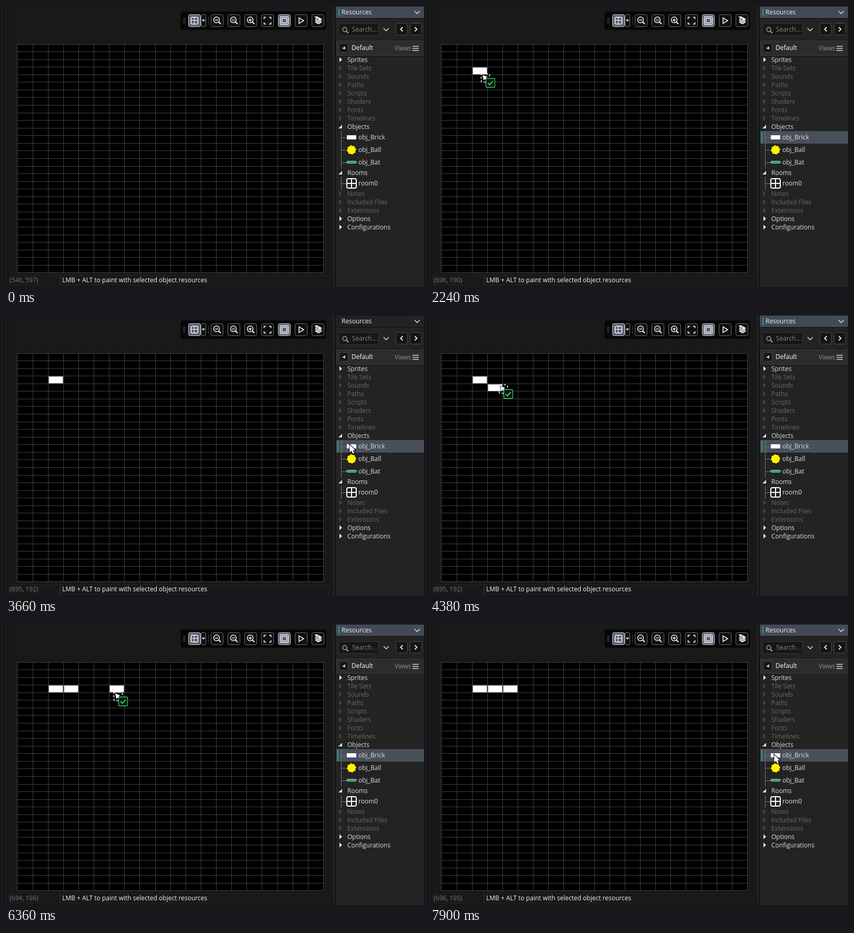
Recreate the animation shown at these times as an HTML page with a canvas. Size 796 by 537 pixels, loop 7990 ms.

```html
<!DOCTYPE html>
<html lang="en">
<head>
<meta charset="utf-8">
<title>Room editor</title>
<style>
  html, body { margin: 0; width: 100%; height: 100%; overflow: hidden; background: #191919; }
  canvas { display: block; }
</style>
</head>
<body>
<canvas id="stage" width="796" height="537"></canvas>
<script>
const ctx = document.getElementById('stage').getContext('2d');
const LOOP = 7990;
const SCALE = 0.91;
const ROOM = { x: 21, y: 73, w: 640, h: 480 };
const LIGHT = '#dedede', DIM = '#696969', GREEN = '#1f9f78', GRID = '#404040';

// Pointer strokes in room units: start, end, steps, from, to, ease, bend, dragging
const move = (t0, t1, steps, from, to, ease = 4.39, bend = 1.2, drag = false) =>
  ({ t0, t1, steps, from, to, ease, bend, drag });
const drag = (t0, t1, steps, from, to) => move(t0, t1, steps, from, to, 3.67, 1, true);
const strokes = [
  move(560, 1280, 9, [546, 597], [701, 189], 3, 1),
  drag(1460, 2240, 10, [696, 190], [83, 61]),
  drag(2330, 2420, 2, [77, 58], [70, 57]),
  drag(2600, 2600, 1, [69, 56], [69, 56]),
  move(2970, 3660, 9, [69, 56], [695, 192]),
  drag(3840, 4470, 8, [695, 192], [119, 66]),
  drag(4650, 4650, 1, [111, 59], [111, 59]),
  move(4920, 5640, 9, [111, 59], [688, 196]),
  move(5730, 5730, 1, [694, 196], [694, 196]),
  drag(5910, 6630, 9, [694, 196], [158, 51]),
  drag(6720, 6720, 1, [154, 51], [154, 51]),
  move(7000, 7720, 9, [154, 51], [692, 195]),
  move(7810, 7900, 2, [695, 195], [696, 195]),
];
const drops = [2970, 4920, 7000];
const unfocused = [[2970, 3840], [4920, 5910], [7000, 7810]];

function pointAt(s, p) {
  const f = 1 - (1 - Math.max(0, p) ** 1.5) ** s.ease;
  return [
    s.from[0] + (s.to[0] - s.from[0]) * f,
    s.from[1] + (s.to[1] - s.from[1]) * f ** s.bend,
  ];
}

function pointerAt(t) {
  const s = strokes.findLast(s => t >= s.t0) || strokes[0];
  const last = s.steps - 1;
  const step = last ? Math.max(0, Math.min(last, Math.floor((t - s.t0 + 1) / (s.t1 - s.t0) * last))) : 1;
  const n = last || 1;
  const [x, y] = pointAt(s, step / n);
  // The readout trails the pointer slightly, and stands still while dragging
  let label = [pointAt(s, (step - 0.24) / n)[0], pointAt(s, (step - 0.46) / n)[1]];
  if (s.drag) label = strokes.findLast(d => d.drag && d.t0 <= s.t0 && d.from[0] > ROOM.w).from;
  return { x, y, drag: s.drag, label };
}

const inRoom = (x, y) => x >= 0 && x < ROOM.w && y >= 0 && y < ROOM.h;

function rect(x, y, w, h, color) {
  ctx.fillStyle = color;
  ctx.fillRect(x, y, w, h);
}
function box(x, y, w, h, r, fill, stroke, line = 1) {
  ctx.beginPath();
  ctx.roundRect(x + 0.5, y + 0.5, w - 1, h - 1, r);
  if (fill) { ctx.fillStyle = fill; ctx.fill(); }
  if (stroke) { ctx.strokeStyle = stroke; ctx.lineWidth = line; ctx.stroke(); }
}
function path(points, { fill, stroke, width = 1, close = !!fill } = {}) {
  ctx.beginPath();
  points.forEach(([x, y]) => ctx.lineTo(x, y));
  if (close) ctx.closePath();
  if (stroke) { ctx.strokeStyle = stroke; ctx.lineWidth = width; ctx.stroke(); }
  if (fill) { ctx.fillStyle = fill; ctx.fill(); }
}
function circle(x, y, r, stroke, width, fill) {
  ctx.beginPath();
  ctx.arc(x, y, r, 0, Math.PI * 2);
  if (fill) { ctx.fillStyle = fill; ctx.fill(); }
  if (stroke) { ctx.strokeStyle = stroke; ctx.lineWidth = width; ctx.stroke(); }
}
function text(str, x, middle, color = LIGHT) {
  ctx.font = '12px "Open Sans", sans-serif';
  ctx.fillStyle = color;
  ctx.fillText(str, x, middle + 4);
}
function chevron(x, y, dx, dy, width = 1.5) {
  const points = dy ? [[x - dx, y - dy], [x, y + dy], [x + dx, y - dy]]
                    : [[x - dx, y - 4], [x + dx, y], [x - dx, y + 4]];
  path(points, { stroke: '#e0e0e0', width });
}

const gridX = i => i ? Math.floor(22 + 32 * SCALE * i) : 21;
const gridY = j => Math.floor(73.05 + 16 * SCALE * j);

function drawRoom() {
  rect(21, 73, 584, 437, '#000');
  for (let i = 0; i <= 20; i++) rect(gridX(i), 73, 1, 437, GRID);
  for (let j = 0; j <= 30; j++) rect(21, gridY(j), 584, 1, GRID);
}
function drawBrick(col, row) {
  const x = gridX(col) + 1, y = gridY(row) + 1;
  rect(x, y, 28, 14, '#808080');
  rect(x + 1, y + 1, 26, 12, '#fff');
}

function magnifier(x, sign) {
  circle(x - 1, 26.5, 5.5, '#fff', 1.4);
  path([[x + 3, 30.5], [x + 7, 34.5]], { stroke: '#fff', width: 2 });
  if (sign === '=') {
    rect(x - 4, 25, 6, 1, '#fff');
    rect(x - 4, 28, 6, 1, '#fff');
    return;
  }
  rect(x - 4, 26, 6, 1.5, '#fff');
  if (sign === '+') rect(x - 1.75, 24, 1.5, 6, '#fff');
}

function drawToolbar() {
  box(332, 10, 278, 36, 3, '#070707');
  for (let y = 23; y < 34; y += 3) rect(337, y, 5, 1, '#555');
  box(347, 16, 24, 24, 3, '#596070', '#c4c8d0');
  box(352, 21, 14, 14, 2, null, '#fff', 1.5);
  rect(358, 21, 1, 14, '#fff');
  rect(352, 27, 14, 1, '#fff');
  box(371, 16, 10, 24, 2, '#101010', '#777');
  path([[373, 26], [379, 26], [376, 30]], { fill: '#fff' });
  rect(385, 20, 1, 16, '#444');

  for (let x = 402; x <= 594; x += 32)
    box(x - 12, 16, 24, 24, 3, x === 530 ? '#596070' : '#101010', x === 530 ? '#c4c8d0' : '#6c6c6c');
  magnifier(402, '-');
  magnifier(434, '=');
  magnifier(466, '+');
  for (const sx of [-1, 1]) for (const sy of [-1, 1])
    path([[498 + sx * 3, 28 + sy * 6.5], [498 + sx * 6.5, 28 + sy * 6.5], [498 + sx * 6.5, 28 + sy * 3]],
      { stroke: '#fff', width: 1.5 });
  box(522, 20, 16, 16, 1, null, '#fff', 1.5);
  box(525, 23, 10, 10, 0, null, '#fff', 1.5);
  path([[558, 22.5], [558, 33.5], [567, 28]], { stroke: '#fff', width: 1.5, close: true });
  for (const y of [31, 28, 25])
    path([[588, y], [595, y - 4], [602, y], [595, y + 4]], { fill: '#fff', stroke: '#101010', width: 1.5 });
  path([[587, 20], [594, 20], [594, 26]], { fill: '#fff', stroke: '#101010', width: 1.5 });
}

function drawStatus(label) {
  rect(4, 513, 616, 22, '#111');
  box(5, 514, 98, 20, 0, '#191919', '#272727');
  box(103, 514, 515, 20, 0, '#191919', '#272727');
  const [x, y] = label.map(Math.round);
  text(`(${x}, ${y})`, 7, 524, inRoom(x, y) ? '#f0f0f0' : '#767676');
  text('LMB + ALT to paint with selected object resources', 107, 524, '#f4f4f4');
}

const folders = [
  ['Sprites', 103, 1], ['Tile Sets', 119], ['Sounds', 135], ['Paths', 151], ['Scripts', 167],
  ['Shaders', 183], ['Fonts', 199], ['Timelines', 215], ['Objects', 231, 2], ['Rooms', 319, 2],
  ['Notes', 359], ['Included Files', 375], ['Extensions', 391], ['Options', 407, 1], ['Configurations', 423, 1],
];
const items = [['obj_Brick', 251], ['obj_Ball', 275], ['obj_Bat', 299], ['room0', 339]];

function drawTree(selected) {
  if (selected) {
    rect(629, 239, 167, 24, '#48505a');
    rect(631, 240, 2, 22, GREEN);
  }
  for (const [name, y, state] of folders) {
    text(name, 650, y, state ? LIGHT : DIM);
    if (state === 2) path([[640, y - 4], [640, y + 3], [633, y + 3]], { fill: '#ddd' });
    else if (state) path([[635, y - 5], [640, y - 0.5], [635, y + 4]], { fill: '#eee' });
    else path([[635.5, y - 4], [639.5, y - 0.5], [635.5, y + 3]], { stroke: '#666', close: true });
  }
  rect(638, 239, 1, 72, '#777');
  rect(638, 327, 1, 24, '#777');
  for (const [name, y] of items) {
    rect(638, y, 10, 1, '#777');
    text(name, 671, y);
  }
  rect(649, 247, 18, 8, '#fff');
  circle(658, 275, 9, null, 0, '#fff200');
  ctx.setLineDash([4, Math.PI * 17.4 / 8 - 4]);
  circle(658, 275, 8.7, '#000', 1.2);
  ctx.setLineDash([]);
  box(648, 296, 20, 5, 2, '#2f9e72', '#9bd0ba');
  box(648.5, 329.5, 19, 19, 3, null, '#fff', 2);
  rect(657, 330, 2, 18, '#fff');
  rect(649, 338, 18, 2, '#fff');
}

function drawSidebar(focused, selected) {
  rect(620, 0, 6, 537, '#212121');
  rect(620, 0, 1, 537, '#121212');
  rect(626, 0, 2, 537, '#121212');
  rect(628, 0, 168, 537, '#232323');
  rect(628, 0, 168, 1, '#111');
  rect(628, 1, 168, 22, focused ? '#434a57' : '#222');
  rect(628, 23, 168, 1, '#0d0d0d');
  if (focused) rect(633, 5, 2, 14, GREEN);
  text('Resources', 639, 12, '#f0f0f0');
  chevron(783, 12, 5, 2.5);

  box(633, 33, 77, 24, 3, '#171717', '#383838');
  circle(645, 45, 4, '#aaa', 1.5);
  path([[648, 48], [652, 52]], { stroke: '#aaa', width: 2 });
  text('Search...', 659, 45, '#858585');
  chevron(724, 45, 5, 2.5);
  for (const [x, dir] of [[742, -2], [769, 2]]) {
    box(x, 33, 23, 23, 3, '#151515', '#4c4c4c');
    chevron(x + 11.5, 44.5, dir, 0, 2);
  }

  rect(628, 65, 168, 31, '#101010');
  rect(629, 66, 167, 29, '#454545');
  rect(630, 67, 166, 27, '#2c2c2c');
  box(634, 71, 18, 18, 2, '#171717', '#4a4a4a');
  path([[646, 77], [646, 83], [640, 81]], { fill: '#ccc' });
  text('Default', 658, 80, '#fff');
  text('Views', 740, 81, '#8f8f8f');
  for (const y of [76, 80, 84]) rect(774, y, 12, 2, '#aaa');
  drawTree(selected);
}

const arrow = [[0, 0], [0, 15], [3.5, 12], [6, 17.5], [8.5, 16.5], [6.2, 11], [10.5, 11]];
const dragArrow = [[3, 3], [5, 13], [7.5, 10.5], [11, 14], [13, 12], [9.5, 8.5], [12, 6]];
function drawPointer(shape, x, y, width) {
  path(shape.map(([dx, dy]) => [x + dx, y + dy]), { fill: '#fff', stroke: '#000', width });
}
function drawDragCursor(x, y) {
  ctx.setLineDash([4, 3]);
  box(x, y, 17, 17, 2, null, '#fff', 1.5);
  ctx.setLineDash([]);
  drawPointer(dragArrow, x, y, 1.5);
  box(x + 9, y + 9, 18, 18, 2, '#0c140e', '#32d35c', 1.3);
  path([[x + 13, y + 18], [x + 16.5, y + 21.5], [x + 23, y + 14.5]], { stroke: '#32d35c', width: 2 });
}

function draw(t) {
  const pointer = pointerAt(t);
  const { x, y } = pointer;
  const dragging = pointer.drag && inRoom(x, y);
  const px = Math.round(ROOM.x + x * SCALE), py = Math.round(ROOM.y + y * SCALE);

  rect(0, 0, 796, 537, '#191919');
  rect(0, 0, 2, 537, '#212121');
  rect(2, 0, 2, 537, '#121212');
  drawRoom();
  drops.forEach((time, i) => { if (t >= time) drawBrick(2 + i, 3); });
  if (dragging) drawBrick(Math.floor(x / 32), Math.floor(y / 16));
  drawToolbar();
  drawStatus(pointer.label);
  drawSidebar(!unfocused.some(([from, to]) => t >= from && t < to), t >= 1460);
  if (dragging) drawDragCursor(px, py);
  else drawPointer(arrow, px + 1.5, py - 0.5, 2);
}

const start = performance.now();
function frame() {
  draw((performance.now() - start) % LOOP);
  requestAnimationFrame(frame);
}
frame();
</script>
</body>
</html>
```
